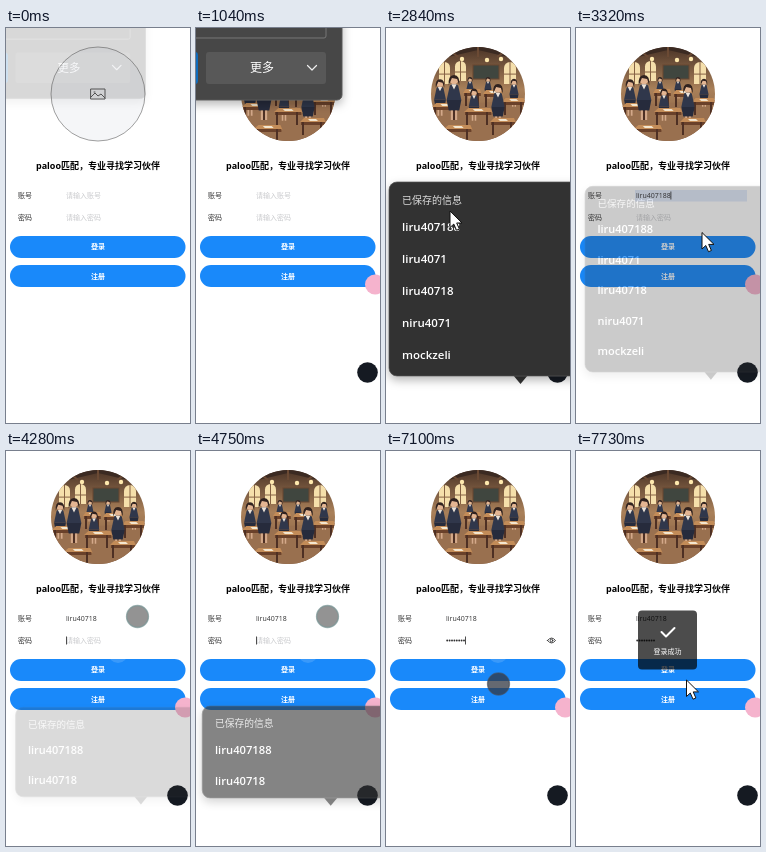
These frames come from a looping animation (184 by 395 pixels, 8 s). An HTML page:

```html
<!DOCTYPE html>
<html lang="zh">
<head>
<meta charset="utf-8">
<style>
html, body { margin: 0; width: 100%; height: 100%; overflow: hidden; background: #fff }
svg { display: block; width: 184px; height: 395px }
text { font: 7px "Open Sans", "Noto Sans CJK SC", sans-serif; fill: #323233; dominant-baseline: central }
.title { font-size: 9px; font-weight: 700; fill: #000; text-anchor: middle }
.hint { fill: #c8c9cc }
.button { fill: #fff; font-weight: 600; text-anchor: middle }
.more { font-size: 12px; fill: #fff; text-anchor: middle }
.head { font-size: 10px; font-weight: 500; fill: #ddd }
.item { font-size: 11.5px; font-weight: 600; fill: #fff }
.line { fill: none; stroke-linecap: round; stroke-linejoin: round }
</style>
</head>
<body>
<svg viewBox="0 0 184 395">
  <defs>
    <clipPath id="round"><circle cx="92" cy="66" r="47"/></clipPath>
    <linearGradient id="room" x2="0" y2="1">
      <stop offset="0" stop-color="#4b3427"/>
      <stop offset=".45" stop-color="#a98059"/>
      <stop offset="1" stop-color="#7c553c"/>
    </linearGradient>
    <filter id="shadow" x="-20%" y="-20%" width="140%" height="150%">
      <feDropShadow dx="0" dy="4" stdDeviation="5" flood-opacity=".28"/>
    </filter>
  </defs>

  <g id="blank">
    <circle cx="92" cy="66" r="47" fill="#f5f6f8" stroke="#777" stroke-width=".7"/>
    <path class="line" stroke="#555" d="M85 61h14v10h-14zM85 69l4-4 3 3 3-2 4 4M88 64h1"/>
  </g>
  <g id="photo" clip-path="url(#round)"></g>

  <text class="title" x="92" y="137">paloo匹配，专业寻找学习伙伴</text>
  <rect id="filled" x="59" y="162" width="112" height="11.5" fill="#e1eafb"/>
  <text x="12" y="167.5">账号</text>
  <text x="12" y="189.5">密码</text>
  <text id="userHint" class="hint" x="60" y="167.5">请输入账号</text>
  <text id="passHint" class="hint" x="60" y="189.5">请输入密码</text>
  <text id="user" x="60" y="167.5"></text>
  <g id="dots"></g>
  <rect id="caret" width=".8" height="8" fill="#222"/>
  <g id="eye" class="line" stroke="#323233" stroke-width=".9">
    <path d="M161.500 189.500q4-5 8 0q-4 5-8 0z"/><circle cx="165.500" cy="189.500" r="1.300"/>
  </g>

  <rect id="login" x="4" y="208" width="175.500" height="22" rx="11" fill="#1989fa"/>
  <rect x="4" y="237" width="175.500" height="22" rx="11" fill="#1989fa"/>
  <text class="button" x="92" y="218.500">登录</text>
  <text class="button" x="92" y="248.500">注册</text>

  <g id="widgets">
    <circle cx="179" cy="256.500" r="10" fill="#f5b3cd"/>
    <circle cx="171.500" cy="344.500" r="10.300" fill="#151a22"/>
  </g>
  <circle id="ghost" cx="112" cy="202" r="10" fill="#fff" opacity=".14"/>

  <g id="menu">
    <rect x="-20" y="-20" width="166" height="92" rx="5" fill="#464646" stroke="#5a5a5a" filter="url(#shadow)"/>
    <path class="line" stroke="#777" d="M0 10H128q2 0 2-2V0"/>
    <rect x="-10" y="24" width="12" height="32" rx="3" fill="#0f6cbd"/>
    <rect x="10" y="24" width="120" height="32" rx="3" fill="#585858"/>
    <text class="more" x="66" y="39.500">更多</text>
    <path class="line" stroke="#eee" stroke-width="1.200" d="M111.500 37.500l4.500 4.500 4.500-4.500"/>
  </g>

  <g id="userList"></g>
  <g id="passList"></g>

  <g id="toast">
    <rect x="62" y="159.500" width="59" height="59" rx="4" fill="#000" opacity=".7"/>
    <path class="line" stroke="#fff" stroke-width="2" d="M85.500 181l4.500 4.500 8.500-8.500"/>
    <text class="button" x="91.500" y="200" style="font-weight:400">登录成功</text>
  </g>

  <circle id="touch" r="11" stroke-width="1.300"/>
  <path id="arrow" d="M0 0V16.500l3.800-3.500 2.700 6.200 2.900-1.200-2.700-6.100h5.300z" fill="#fff" stroke="#111" stroke-width="1"/>
</svg>

<script>
const LOOP = 8000;
const NAME = 'liru40718';
const $ = id => document.getElementById(id);
const clamp = v => Math.max(0, Math.min(1, v));
const ramp = (t, from, to) => clamp((t - from) / (to - from));
const mix = (a, b, k) => a + (b - a) * k;
const within = (t, from, to) => t >= from && t < to;
const show = (id, on) => $(id).style.display = on ? '' : 'none';
const place = (id, x, y) => $(id).setAttribute('transform', `translate(${x} ${y})`);

// Classroom picture
const shape = (d, fill) => `<path d="${d}" fill="${fill}"/>`;
const windowAt = (x, y, w, h) =>
  shape(`M${x} ${y + h}v${-h + w / 2}a${w / 2} ${w / 2} 0 0 1 ${w} 0v${h - w / 2}z`, '#f5dfab') +
  `<path d="M${x + w / 2} ${y}v${h}M${x} ${y + h * .55}h${w}" stroke="#856143" stroke-width="1"/>`;
const deskAt = (x, y, w) =>
  shape(`M${x} ${y}l${w * .2} -4h${w}l${w * .1} 5z`, '#c38c58') +
  shape(`M${x + 1} ${y}h${w * 1.2}v3h${-w * 1.2}z`, '#6a412a') +
  shape(`M${x + 2} ${y}v13h2v-13zM${x + w} ${y}v13h2v-13z`, '#4e3024') +
  shape(`M${x + w * .4} ${y - 3}h${w * .4}l2 2h${-w * .4}z`, '#f3e6d0');
const pupilAt = (x, y, s) => `<g transform="translate(${x} ${y}) scale(${s})">` +
  shape('M-4 8Q0 5 4 8L7 22L-7 22Z', '#30374b') +
  shape('M-2.500 7L0 12L2.500 7Z', '#ece3d8') +
  shape('M-7 22H7L5 32H-5Z', '#262b3c') +
  shape('M-3 32v9h2v-9zM1 32v9h2v-9z', '#d4a98a') +
  `<circle cy="3" r="4" fill="#e3b592"/>` +
  shape('M-5 8Q-6-2 0-2Q6-2 5 8L3 2L-2 1Z', '#30221f') + '</g>';

$('photo').innerHTML =
  '<rect x="45" y="19" width="94" height="94" fill="url(#room)"/>' +
  shape('M45 33L92 22L139 33V19H45Z', '#3b2a22') +
  '<path d="M60 19l12 10M92 19v10M125 19l-14 10" stroke="#6b4a34" stroke-width="2"/>' +
  windowAt(53, 34, 11, 22) + windowAt(69, 33, 11, 20) + windowAt(118, 34, 12, 22) +
  '<rect x="87" y="37" width="26" height="14" fill="#40463f" stroke="#694630"/>' +
  [76, 101, 115].map(x => `<circle cx="${x}" cy="${30 + x % 3}" r="2.200" fill="#ffe9ae"/>`).join('') +
  shape('M45 78L139 72V113H45Z', '#99704f') +
  pupilAt(84, 50, .5) + pupilAt(102, 50, .5) + pupilAt(128, 52, .65) +
  deskAt(77, 65, 14) + deskAt(97, 66, 15) + deskAt(116, 74, 18) +
  pupilAt(54, 53, .85) + pupilAt(88, 62, .75) + pupilAt(112, 58, .95) +
  deskAt(46, 79, 21) + deskAt(78, 84, 22) + deskAt(104, 94, 20) +
  pupilAt(68, 49, 1.050) + deskAt(58, 101, 22);

// Autofill popups
function buildList(id, top, names) {
  $(id).innerHTML =
    `<path d="M127 347h15l-7.500 9z" fill="#333"/>` +
    `<rect x="3" y="${top}" width="280" height="${348 - top}" rx="8" fill="#333" stroke="#555" stroke-width=".7" filter="url(#shadow)"/>` +
    `<rect class="hover" x="8" y="${top + 28}" width="270" height="31" rx="4" fill="#484848" visibility="hidden"/>` +
    `<text class="head" x="16" y="${top + 18}">已保存的信息</text>` +
    names.map((n, i) => `<text class="item" x="16" y="${top + 44 + 32 * i}">${n}</text>`).join('');
}
buildList('userList', 154, [NAME + '8', 'liru4071', NAME, 'niru4071', 'mockzeli']);
buildList('passList', 254, [NAME + '8', NAME]);
const hover = document.querySelector('#userList .hover');

$('dots').innerHTML = Array.from({ length: 8 }, (_, i) =>
  `<circle cx="${61.2 + 2.4 * i}" cy="189.500" r=".95" fill="#323233"/>`).join('');
const dots = [...$('dots').children];
const keyTimes = [5220, 5290, 5360, 5640, 5700, 5770, 6030, 6100];

// Panels fade while growing to full size around (x, y)
function fade(id, alpha, x, y) {
  show(id, alpha > 0);
  $(id).setAttribute('opacity', alpha);
  const s = .943 + .057 * alpha;
  $(id).setAttribute('transform', `translate(${x * (1 - s)} ${y * (1 - s)}) scale(${s})`);
}

function drawPointer(t) {
  const arrow = within(t, 2840, 3560) || t >= 7300;
  show('arrow', arrow);
  show('touch', within(t, 3560, 7300));
  if (t >= 7300) place('arrow', 110.5, 229);
  else {
    const down = ramp(t, 2840, 2910), move = ramp(t, 3110, 3310), up = ramp(t, 3400, 3700);
    place('arrow', mix(64, 126, move), mix(183 + 5 * down, 204.500, move) - 30 * up);
  }
  const k = ramp(t, 6780, 6900), rise = ramp(t, 3560, 3800), pressed = t >= 7060;
  place('touch', mix(131.5, 112.5, k), mix(mix(188, 165.5, rise), 233, k));
  $('touch').setAttribute('fill', pressed ? 'rgba(50,55,65,.75)' : 'rgba(105,105,105,.72)');
  $('touch').setAttribute('stroke', pressed ? 'rgba(70,75,85,.6)' : 'rgba(120,150,150,.7)');
}

function drawFields(t) {
  const count = keyTimes.filter(k => t >= k).length;
  show('userHint', t < 3110);
  show('passHint', !count);
  show('filled', within(t, 3110, 3600));
  $('user').textContent = t < 3110 ? '' : t < 3600 ? NAME + '8' : NAME;
  dots.forEach((d, i) => d.style.display = i < count ? '' : 'none');
  show('eye', count && t < 7300);
  show('caret', within(t, 3110, 6100) || within(t, 6630, 7300));
  if (t < 4280) place('caret', t < 3600 ? 94.5 : 91.5, 163.5);
  else place('caret', 60 + 2.4 * count, 185.5);
}

function draw(t) {
  show('blank', t < 140);
  show('photo', t >= 140);
  fade('menu', t < 210 ? mix(.2, 1, t / 210) : 1 - ramp(t, 1110, 1400), 0, 36);
  $('widgets').setAttribute('opacity', ramp(t, 880, 1000));
  drawFields(t);
  hover.setAttribute('visibility', t >= 2910 && t < 3250 ? 'visible' : 'hidden');
  fade('userList', ramp(t, 1740, 1910) * (1 - ramp(t, 3110, 3390)), 143, 255);
  fade('passList', ramp(t, 4240, 4480) * (1 - ramp(t, 4670, 4870)), 143, 302);
  show('ghost', within(t, 3880, 7300));
  $('login').setAttribute('fill', within(t, 7140, 7300) ? '#177be1' : '#1989fa');
  const toast = ramp(t, 7400, 7700);
  show('toast', toast > 0);
  $('toast').setAttribute('opacity', toast);
  drawPointer(t);
}

const start = performance.now();
function tick() {
  draw((performance.now() - start) % LOOP);
  requestAnimationFrame(tick);
}
tick();
</script>
</body>
</html>
```
